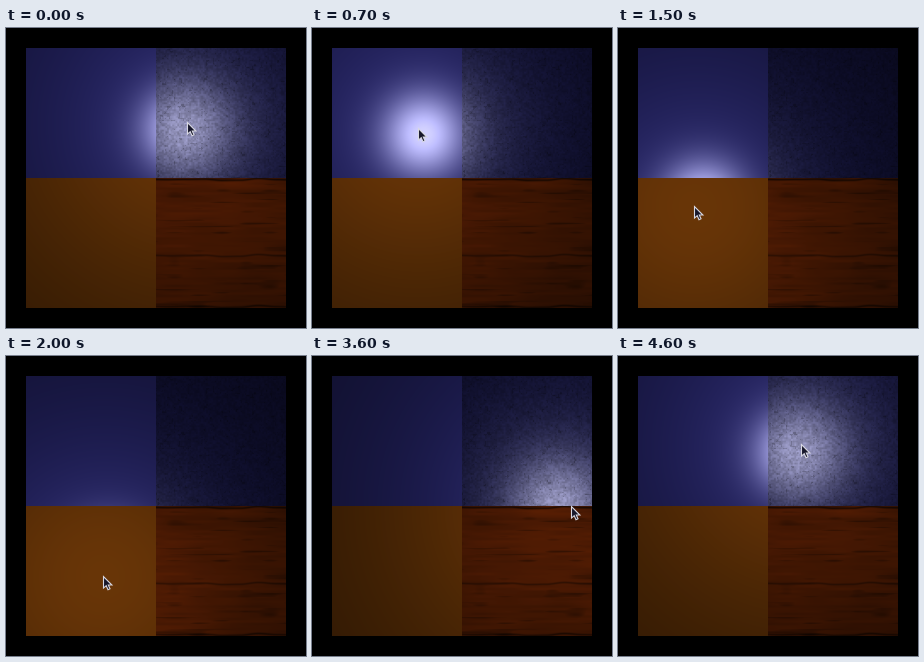
An HTML page with a canvas that plays this animation: 300x300 px, repeating every 4.7 s.

```html
<!DOCTYPE html>
<html lang="en">
<head>
<meta charset="utf-8">
<title>Material light</title>
<style>
  html, body { margin: 0; width: 100%; height: 100%; overflow: hidden; background: #000; }
  canvas { display: block; width: 300px; height: 300px; }
</style>
</head>
<body>
<canvas id="stage" width="300" height="300"></canvas>
<script>
const ctx = document.getElementById('stage').getContext('2d');
const LOOP = 4700, STEP = 100, START = 20, SIZE = 260, MID = 150, HEIGHT = 160;

// Pointer path: time, x, y
const path = [
  [0, 181, 94], [300, 151, 98], [700, 106, 100], [1100, 90, 127],
  [1500, 76, 178], [1800, 81, 206], [2100, 108, 225], [2400, 155, 228],
  [2700, 198, 220], [3000, 228, 212], [3300, 249, 186], [3600, 259, 150],
  [4000, 247, 103], [4300, 218, 82], [4600, 183, 88], [4700, 181, 94]
];

// Diffuse colour, then tight and wide highlight strengths and widths
const materials = {
  paint:   { color: [36, 35, 101], spec: 165, spread: 28, halo: 12, haloSpread: 65 },
  leather: { color: [18, 18, 58], spec: 98, spread: 33, halo: 30, haloSpread: 68 },
  card:    { color: [104, 53, 7], spec: 0 },
  wood:    { color: [79, 27, 3], spec: 0 }
};

function hash(x, y) {
  const s = Math.sin(x * 127.1 + y * 311.7) * 43758.5453;
  return s - Math.floor(s);
}

function noise(x, y) {
  const ix = Math.floor(x), iy = Math.floor(y);
  const ease = v => v * v * (3 - 2 * v);
  const u = ease(x - ix), v = ease(y - iy);
  const top = hash(ix, iy) * (1 - u) + hash(ix + 1, iy) * u;
  const low = hash(ix, iy + 1) * (1 - u) + hash(ix + 1, iy + 1) * u;
  return top * (1 - v) + low * v;
}

function leatherGrain(x, y) {
  const n = noise(x / 1.7, y / 1.7) + 0.5 * noise(x / 4, y / 4) - 0.75;
  const pore = noise(x / 2.3 + 40, y / 2.3) > 0.86 ? 0.16 : 0;
  return 1 + 0.24 * n - pore;
}

function woodGrain(x, y) {
  const grain = noise(x / 28, y / 2.5) - 0.5;
  const broad = noise(x / 60, y / 11 + 30) - 0.5;
  const streak = Math.max(0, noise(x / 24 + 9, y / 3 + 5) - 0.72);
  const wobble = noise(x / 18, 3) * 2;
  const seam = at => Math.exp(-((y - at - wobble) ** 2) / 1.2);
  return 1 + 0.16 * grain + 0.18 * broad - 1.1 * streak
    - 0.6 * seam(150) - 0.4 * seam(226) - 0.45 * seam(277);
}

const pixels = [];
for (let y = START; y < START + SIZE; y++) {
  for (let x = START; x < START + SIZE; x++) {
    const right = x >= MID, low = y >= MID;
    const kind = low ? (right ? 'wood' : 'card') : (right ? 'leather' : 'paint');
    const grain = kind === 'wood' ? woodGrain(x, y) : kind === 'leather' ? leatherGrain(x, y) : 1;
    pixels.push({ x, y, grain, mat: materials[kind] });
  }
}

function pointerAt(t) {
  let i = 0;
  while (i < path.length - 2 && t >= path[i + 1][0]) i++;
  const a = path[i], b = path[i + 1];
  const before = path[Math.max(i - 1, 0)], after = path[Math.min(i + 2, path.length - 1)];
  const span = b[0] - a[0], u = (t - a[0]) / span;
  const curve = k => {
    const m0 = (b[k] - before[k]) / (b[0] - before[0]) * span;
    const m1 = (after[k] - a[k]) / (after[0] - a[0]) * span;
    return (2 * u ** 3 - 3 * u * u + 1) * a[k] + (u ** 3 - 2 * u * u + u) * m0
      + (3 * u * u - 2 * u ** 3) * b[k] + (u ** 3 - u * u) * m1;
  };
  return [curve(1), curve(2)];
}

const image = ctx.createImageData(SIZE, SIZE);
const bell = (d2, width) => Math.exp(-d2 / (2 * width * width));

function shade(lx, ly) {
  const toCentre = v => v + (MID - v) * 0.12;
  const sx = toCentre(lx), sy = toCentre(ly);
  let at = 0;
  for (const { x, y, grain, mat } of pixels) {
    const d2 = (x - lx) ** 2 + (y - ly) ** 2;
    const diffuse = HEIGHT / Math.sqrt(HEIGHT * HEIGHT + d2);
    let shine = 0;
    if (mat.spec) {
      const s2 = (x - sx) ** 2 + (y - sy) ** 2;
      shine = mat.spec * bell(s2, mat.spread) + mat.halo * bell(s2, mat.haloSpread);
    }
    for (let k = 0; k < 3; k++) {
      image.data[at++] = (mat.color[k] * diffuse + shine) * grain;
    }
    image.data[at++] = 255;
  }
  ctx.putImageData(image, START, START);
}

const arrow = new Path2D('M0 0V11.6L2.7 9.2L4.5 13.2L6.5 12.3L4.8 8.5H8.4Z');

function drawPointer(x, y) {
  ctx.save();
  ctx.translate(x + 0.5, y + 0.5);
  ctx.fillStyle = '#17172a';
  ctx.strokeStyle = '#d8d8e2';
  ctx.lineWidth = 1.1;
  ctx.fill(arrow);
  ctx.stroke(arrow);
  ctx.restore();
}

function render(t) {
  const [x, y] = pointerAt(t);
  ctx.fillStyle = '#000';
  ctx.fillRect(0, 0, 300, 300);
  shade(x, y);
  drawPointer(Math.round(x), Math.round(y));
}

const start = performance.now();
let shown = -1;
function tick() {
  const elapsed = (performance.now() - start) % LOOP;
  const t = Math.floor(elapsed / STEP) * STEP;
  if (t !== shown) render(shown = t);
  requestAnimationFrame(tick);
}
tick();
</script>
</body>
</html>
```
